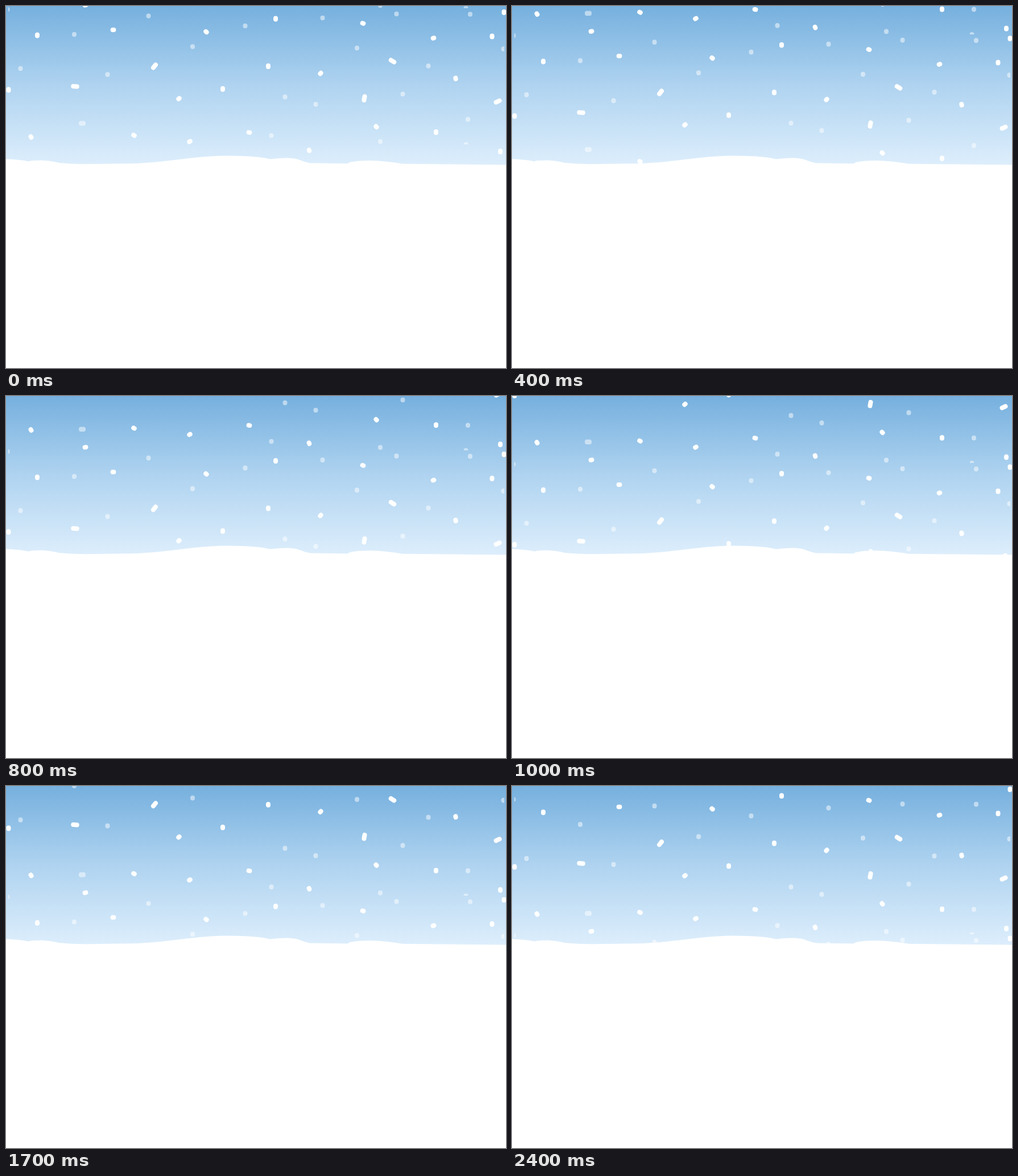
An HTML page with a canvas for the animation above (2500 ms loop, 879 by 637 pixels).

```html
<!DOCTYPE html>
<html lang="en">
<head>
<meta charset="utf-8">
<title>Snowfall</title>
<style>
  html, body { margin: 0; width: 100%; height: 100%; overflow: hidden; background: #fff; }
  canvas { display: block; }
</style>
</head>
<body>
<canvas id="stage" width="879" height="637"></canvas>
<script>
const ctx = document.getElementById('stage').getContext('2d');
const W = 879, H = 637, LOOP = 2500, STEP = 100;

// Flake centres. Each group runs in order of tilt, so the index gives the angle.
const small = [
  [553, 118.5], [304, 163], [323, 238.5], [751.5, 56.5], [139.5, -1.5], [188.5, 42], [427.5, 222.5],
  [627.5, 30.5], [225, 227.5], [352, 45.5], [651, 212.5], [44, 230.5], [533, 254], [790.5, 127.5],
  [869, 256], [4.5, 147.5], [461, 106], [55, 51.5], [474, 22.5], [756, 222], [854.5, 53.5],
  [875.5, 11], [381, 146]
];
const long = [[630, 162.5], [261, 106], [864.5, 168], [121.5, 141.5], [679.5, 97]];
const faint = [
  [2.5, 6], [120, 50], [250.5, 17.5], [420.5, 35], [328, 71.5], [556.5, 21], [686.5, 14],
  [816, 14.5], [617, 74], [742.5, 105.5], [874.5, 75.5], [25.5, 110], [178.5, 120.5],
  [490.5, 160], [544.5, 173], [697.5, 155], [132, 206.5], [136, 206.5], [466.5, 228],
  [658, 238.5], [812, 199.5], [808.5, 244]
];

// One path of short strokes; round caps turn them into flakes.
function flakes(points, length, degrees) {
  const path = new Path2D();
  points.forEach(([x, y], i) => {
    const a = degrees(i) * Math.PI / 180;
    const dx = Math.cos(a) * length / 2, dy = Math.sin(a) * length / 2;
    path.moveTo(x - dx, y - dy);
    path.lineTo(x + dx, y + dy);
  });
  return path;
}

const near = flakes(small, 1.8, i => Math.min(90, 10 * i - 50));
near.addPath(flakes(long, 6.5, i => 28 * i - 80));
const far = flakes(faint, .6, () => 90);

// The far layer is cut off at the edges of its tile.
const farTile = new Path2D();
farTile.rect(4, 0, 872, 243.5);

const sky = ctx.createLinearGradient(0, 0, 0, 279);
sky.addColorStop(0, '#76b0de');
sky.addColorStop(.5, '#afd3f0');
sky.addColorStop(1, '#ddeefc');

const ground = new Path2D(`M0 269.3 Q22 270 40 273.4 Q44 271.6 62 271.6 Q76 272 92 275.8
  Q112 278 140 278.2 L230 277 C290 274 335 263.5 390 263.5 Q445 263.8 464 269.5
  Q480 267.4 492 267.4 C518 267.4 518 274 537 276.6 L601 277.2
  C604 273 627 271.9 640 271.9 Q668 272.2 698 277.8 L879 279.5 V637 H0 Z`);

// A steady fall that slows a little towards the end of the loop.
const fall = n => 11.55 * n - .00144 * n ** 3;

function drawLayer(path, color, y, period, clip) {
  ctx.strokeStyle = color;
  for (const top of [y, y - period]) {
    ctx.save();
    ctx.translate(0, top);
    if (clip) ctx.clip(clip);
    ctx.stroke(path);
    ctx.restore();
  }
}

function draw(time) {
  const y = fall(Math.floor(time % LOOP / STEP));
  ctx.fillStyle = sky;
  ctx.fillRect(0, 0, W, H);
  ctx.lineCap = 'round';
  ctx.lineWidth = 8;
  drawLayer(far, 'rgba(255,255,255,.5)', y, 239.7, farTile);
  drawLayer(near, '#fff', y, 262.5);
  ctx.fillStyle = '#fff';
  ctx.fill(ground);
}

const start = performance.now();
function tick() {
  draw(performance.now() - start);
  requestAnimationFrame(tick);
}
tick();
</script>
</body>
</html>
```
